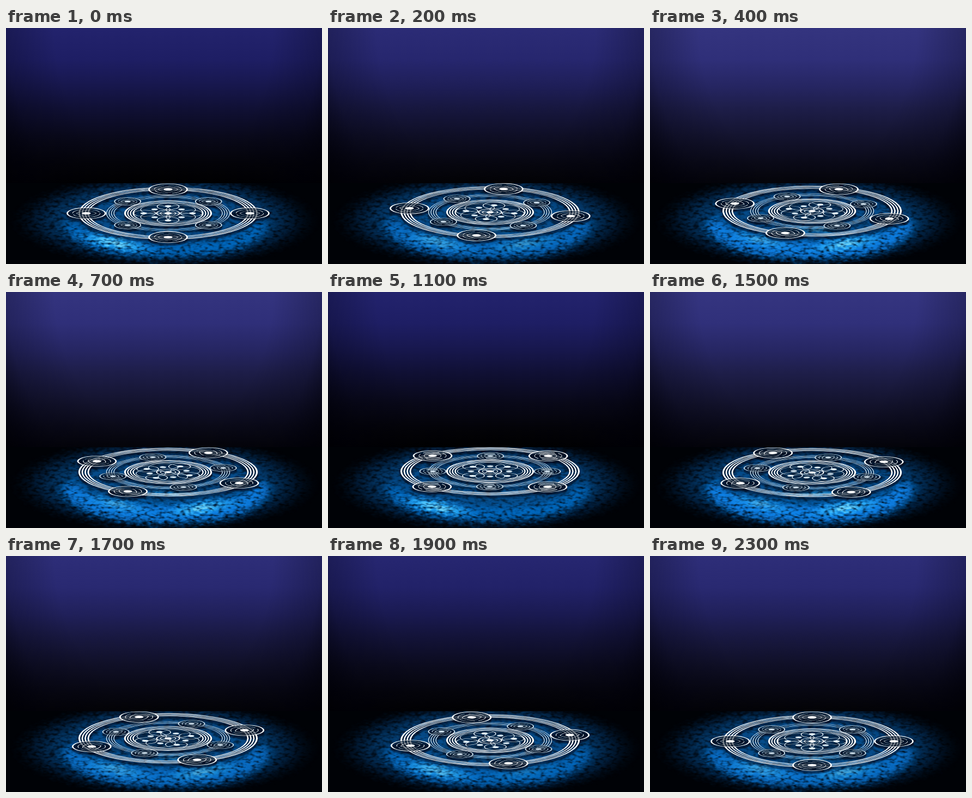
An HTML page that plays this animation: 580x435 px, repeating every 2.4 s.

```html
<!DOCTYPE html>
<html lang="en">
<head>
<meta charset="utf-8">
<title>Rotating seal on water</title>
<style>
  html, body { margin: 0; width: 100%; height: 100%; overflow: hidden; background: #000; }
  svg { display: block; width: 100vw; height: 100vh; }
  #float { filter: drop-shadow(0 5px 1px rgba(0, 4, 16, .85)); }
</style>
</head>
<body>
<svg viewBox="0 0 580 435">
  <defs>
    <linearGradient id="skyDim" x2="0" y2="1">
      <stop offset="0" stop-color="#23236d"/><stop offset=".2" stop-color="#1e1e64"/>
      <stop offset=".35" stop-color="#181850"/><stop offset=".52" stop-color="#101034"/>
      <stop offset=".7" stop-color="#09091a"/><stop offset=".87" stop-color="#030308"/>
      <stop offset="1" stop-color="#000"/>
    </linearGradient>
    <linearGradient id="skyBright" x2="0" y2="1">
      <stop offset="0" stop-color="#353580"/><stop offset=".2" stop-color="#30307a"/>
      <stop offset=".38" stop-color="#262662"/><stop offset=".52" stop-color="#1e1e49"/>
      <stop offset=".7" stop-color="#14142f"/><stop offset=".87" stop-color="#0a0a18"/>
      <stop offset="1" stop-color="#040409"/>
    </linearGradient>
    <radialGradient id="vignette" gradientUnits="userSpaceOnUse" cx="0" cy="0" r="1" gradientTransform="translate(290 0) scale(400 520)">
      <stop offset=".5" stop-color="#00000c" stop-opacity="0"/><stop offset=".72" stop-color="#00000c" stop-opacity=".25"/>
      <stop offset=".84" stop-color="#000008" stop-opacity=".65"/><stop offset="1" stop-color="#000" stop-opacity=".95"/>
    </radialGradient>
    <radialGradient id="pool">
      <stop offset="0" stop-color="#07518f"/><stop offset=".5" stop-color="#054a88"/>
      <stop offset=".68" stop-color="#033563"/><stop offset=".82" stop-color="#011a34"/>
      <stop offset="1" stop-color="#000812" stop-opacity="0"/>
    </radialGradient>
    <radialGradient id="shine">
      <stop offset="0" stop-color="#8ceaff"/><stop offset=".4" stop-color="#2eb4ff" stop-opacity=".85"/>
      <stop offset="1" stop-color="#0878dc" stop-opacity="0"/>
    </radialGradient>
    <filter id="soft" filterUnits="userSpaceOnUse" x="0" y="286" width="580" height="149">
      <feGaussianBlur stdDeviation="9 6"/>
    </filter>
    <filter id="ripple" filterUnits="userSpaceOnUse" x="0" y="286" width="580" height="149" color-interpolation-filters="sRGB">
      <feTurbulence type="fractalNoise" baseFrequency=".1 .22" numOctaves="2" seed="3" result="noise"/>
      <feDisplacementMap in="SourceGraphic" in2="noise" scale="16" xChannelSelector="R" yChannelSelector="G" result="bent"/>
      <feColorMatrix in="noise" values="0 0 0 0 1  0 0 0 0 1  0 0 0 0 1  2.6 0 0 0 -.5" result="mask"/>
      <feComposite in="bent" in2="mask" operator="in"/>
    </filter>
    <clipPath id="floor"><rect y="286" width="580" height="149"/></clipPath>
    <path id="crescent" d="M122 366C150 402 225 409 298 409S440 402 468 366" fill="none" stroke-linecap="round"/>
  </defs>

  <rect width="580" height="435" fill="#000"/>
  <rect width="580" height="287" fill="url(#skyDim)"/>
  <rect id="skyPulse" width="580" height="287" fill="url(#skyBright)"/>
  <rect width="580" height="287" fill="url(#vignette)"/>

  <g clip-path="url(#floor)">
    <rect y="286" width="580" height="149" fill="#000206"/>
    <ellipse cx="292" cy="355" rx="255" ry="84" fill="url(#pool)" opacity=".45"/>
    <g filter="url(#ripple)">
      <ellipse cx="292" cy="355" rx="285" ry="90" fill="url(#pool)"/>
    </g>
    <g id="waterDim" filter="url(#ripple)">
      <use href="#crescent" stroke="#0668be" stroke-width="24" filter="url(#soft)"/>
      <ellipse cx="200" cy="396" rx="90" ry="18" transform="rotate(11 200 396)" fill="url(#shine)"/>
    </g>
    <g id="waterBright" filter="url(#ripple)">
      <use href="#crescent" stroke="#0a80e6" stroke-width="30" filter="url(#soft)"/>
      <ellipse cx="360" cy="398" rx="90" ry="17" transform="rotate(-9 360 398)" fill="url(#shine)"/>
      <ellipse cx="205" cy="391" rx="80" ry="15" transform="rotate(13 205 391)" fill="url(#shine)" opacity=".5"/>
      <ellipse cx="300" cy="372" rx="90" ry="10" fill="url(#shine)" opacity=".5"/>
    </g>
  </g>

  <g id="float"><g id="seal" fill="none" stroke="#fff"></g></g>
</svg>
<script>
const byId = id => document.getElementById(id);
const seal = byId('seal');

function add(tag, attrs, parent = seal) {
  const el = document.createElementNS('http://www.w3.org/2000/svg', tag);
  for (const name in attrs) el.setAttribute(name, attrs[name]);
  return parent.appendChild(el);
}
const circle = (r, width, extra = {}, parent) => add('circle', { r, 'stroke-width': width, ...extra }, parent);

// Places a group at a polar position, measured clockwise from the top.
function polar(deg, radius) {
  const a = deg * Math.PI / 180;
  return add('g', { transform: `translate(${radius * Math.sin(a)} ${-radius * Math.cos(a)})` });
}

function node(deg, radius, size, color) {
  const g = polar(deg, radius);
  g.setAttribute('stroke', color);
  circle(size, size * .08, { fill: '#031326', 'fill-opacity': .6 }, g);
  circle(size * .72, 1.2, { 'stroke-dasharray': `${size * .9} ${size * .23}` }, g);
  const p = size * .52;
  add('path', { d: `M0 ${-p}Q${p * .7} ${-p * .7} ${p} 0Q${p * .7} ${p * .7} 0 ${p}Q${-p * .7} ${p * .7} ${-p} 0Q${-p * .7} ${-p * .7} 0 ${-p}Z`, 'stroke-width': 1.2 }, g);
  circle(size * .23, 0, { fill: color }, g);
}

function buildSeal() {
  const quarter = [0, 90, 180, 270];
  [[163, 3.2], [157.5, 2.6], [152, 2.6], [146.5, 2.8]].forEach(([r, w]) => circle(r, w));
  [113, 108.5, 104, 99.5].forEach(r => circle(r, 1.6, { stroke: '#bfd6e8' }));
  circle(80, 0, { fill: '#0a2c4c', 'fill-opacity': .35 });
  [[79, 3.2], [74, 2.2], [69, 2.2], [64, 2.4]].forEach(([r, w]) => circle(r, w));

  quarter.forEach(deg => {
    circle(20, 1.7, { stroke: '#e2eef5' }, polar(deg, 43));
    circle(27, 1.5, { stroke: '#cfdfea' }, polar(deg + 45, 33));
    circle(6, 0, { fill: '#e8f4fa' }, polar(deg, 45));
    circle(6, 0, { fill: '#d5e4ee' }, polar(deg + 45, 35));
  });
  circle(21, 2.2);
  circle(14, 1.4);
  circle(6.5, 0, { fill: '#fff' });

  quarter.forEach(deg => node(deg + 45, 105, 24, '#d3e4f0'));
  quarter.forEach(deg => node(deg, 150, 35, '#fff'));
}

// time (ms), rotation (degrees), height of the centre (px), brightness
const keys = [
  [0, 0, 341.5, 0], [400, 19.1, 337.5, .95], [700, 29.5, 332, .95], [1100, 45.3, 330.5, 0],
  [1500, 61.4, 332.7, 1], [1900, 77, 339.7, .2], [2300, 90, 341.5, .6]
];

function pose(t) {
  const i = Math.min(keys.length - 2, keys.findLastIndex(k => k[0] <= t));
  const [a, b] = [keys[i], keys[i + 1]];
  const u = (t - a[0]) / (b[0] - a[0]);
  return [1, 2, 3].map(n => a[n] + (b[n] - a[n]) * u);
}

const LOOP = 2400, STEP = 100;

function render(time) {
  const t = Math.floor(time % LOOP / STEP) * STEP;
  const [angle, cy, pulse] = pose(t);
  const tilt = (40.3 + (cy - 330.5) * .34) / 150;
  seal.setAttribute('transform', `translate(297.5 ${cy}) scale(1 ${tilt}) rotate(${angle})`);
  byId('skyPulse').setAttribute('opacity', pulse);
  byId('waterBright').setAttribute('opacity', pulse);
  byId('waterDim').setAttribute('opacity', 1 - pulse * .75);
}

buildSeal();
const start = performance.now();
function tick() {
  render(performance.now() - start);
  requestAnimationFrame(tick);
}
tick();
</script>
</body>
</html>
```
